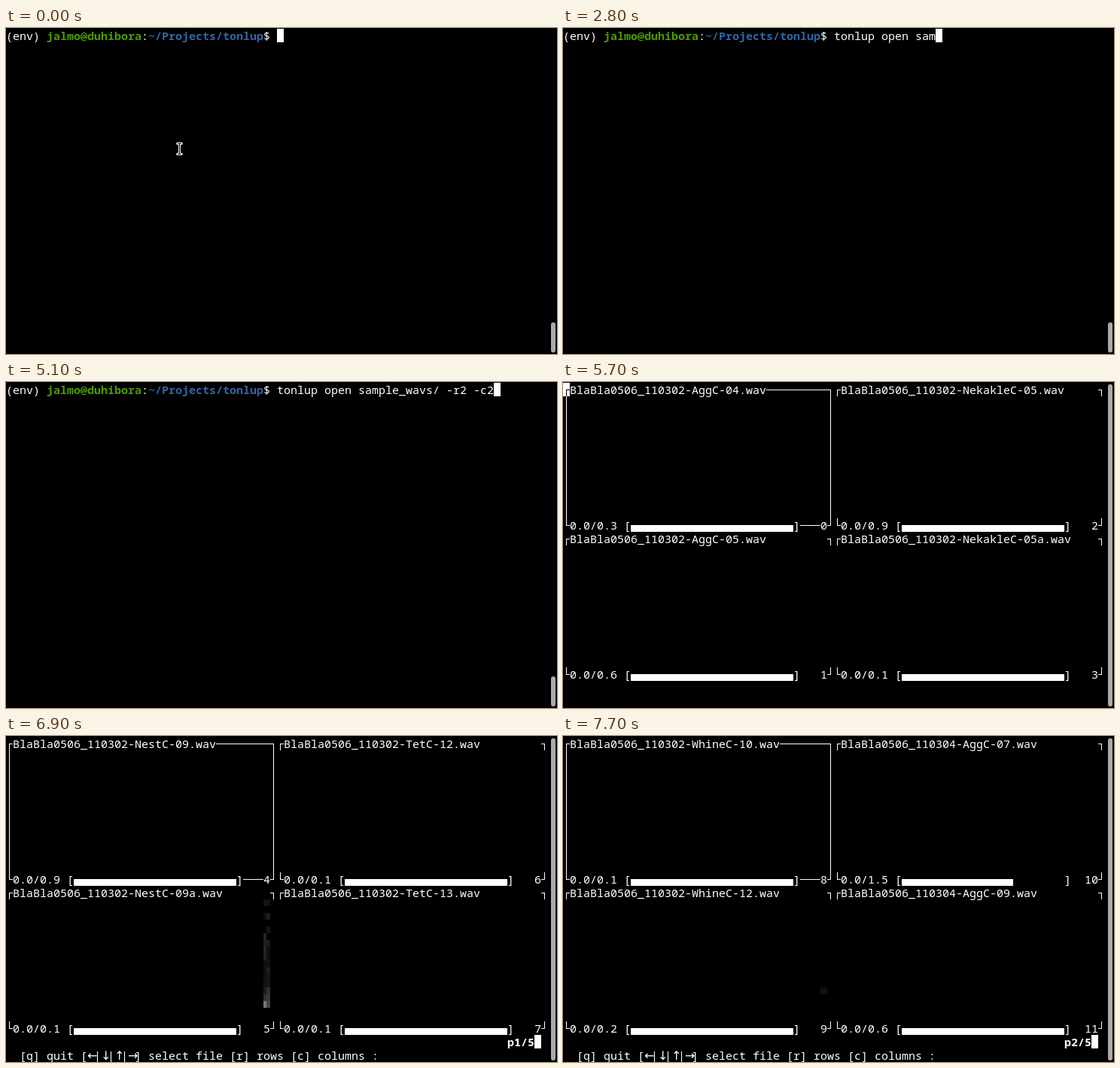
An HTML page for the animation above (8000 ms loop, 732x433 px).

```html
<!DOCTYPE html>
<html lang="en">
<head>
<meta charset="utf-8">
<title>Terminal spectrogram browser</title>
<style>
  html, body { margin: 0; width: 100%; height: 100%; overflow: hidden; background: #000; }
  svg { position: absolute; left: 0; top: 0; display: block; }
  text { font: 15px "Noto Sans Mono", "DejaVu Sans Mono", monospace; white-space: pre; }
  .bold { font-weight: 700; }
  .arrow { font: 16px "DejaVu Sans", sans-serif; }
</style>
</head>
<body>
<svg id="stage" width="732" height="433" viewBox="0 0 732 433"></svg>
<script>
const LOOP = 8000, CW = 9, RH = 18, COLS = 76, ROWS = 16;
const WHITE = '#fff', GREEN = '#4e9a06', BLUE = '#3465a4';
const stage = document.getElementById('stage');

// Bursts of typing: keys split by "|" land 100 ms apart.
const KEYS = Object.entries({
  900: 't|o', 1200: 'n|l|u|p', 1700: ' |o', 2000: 'p|e|n ', 2600: 's|a|m',
  3000: 'p', 3500: 'l|e_wavs/ ', 3800: '-', 4000: 'r', 4200: '2', 4400: ' ',
  4800: '-|c', 5100: '2'
}).flatMap(([at, keys]) => keys.split('|').map((key, i) => ({ at: +at + i * 100, key })));

// Later states inherit whatever they do not change.
const VIEWS = [
  { at: 5700, page: 0, pick: 0, filled: 0, label: 0, cursor: 'corner' },
  { at: 6000, filled: 2, cursor: 'off' },
  { at: 6100, filled: 4, label: 1 },
  { at: 6600, cursor: 'footer' },
  { at: 6900, page: 1, filled: 0 },
  { at: 7100, filled: 4, label: 2 },
  { at: 7400, pick: 2 },
  { at: 7700, page: 2, pick: 0, filled: 0 }
];
VIEWS.forEach((v, i) => { VIEWS[i] = { ...VIEWS[i - 1], ...v }; });

const hash = (a, b) => {
  const n = Math.sin(a * 127.1 + b * 311.7) * 43758.5453;
  return n - Math.floor(n);
};
const ramp = x => Math.min(1, Math.max(0, x));
const bump = (x, mid, spread) => Math.exp(-(((x - mid) / spread) ** 2));
const drift = (x, seed) => {
  const i = Math.floor(x);
  return hash(i, seed) + (hash(i + 1, seed) - hash(i, seed)) * (x - i);
};
const speckle = (c, r, seed) => .25 + 2.2 * hash(c + seed * 80, r + 1) ** 2;

// Harsh call: streaky haze above a bright low band
const rasp = (from, to) => (c, r, seed) => {
  const gate = ramp((c - from) / 10) * ramp((to - c) / 12);
  const haze = 28 * (.4 + 1.2 * hash(c, seed + 40)) * bump(r, 6, 8);
  const band = 190 * (.25 + drift(c / 3, seed + 7)) * bump(r, 14.2, 1.1 + c / 150);
  const floor = 55 * ramp((c - from + 12) / 6) * bump(r, 15, .5);
  return gate * haze * speckle(c, r, seed) +
    (gate * band + floor) * (.45 + .9 * hash(c + seed, r));
};

// Short clicks across all pitches
const pulses = (...centers) => (c, r, seed) => {
  const near = centers.reduce((sum, x) => sum + Math.exp(-(((c - x) / 2) ** 4)), 0);
  const body = (50 + 120 * bump(r, 9.5, 2.5)) * ramp((r + 1) / 3);
  return near * body * speckle(c, r, seed);
};

// Two-part whistle with evenly spaced, gently bending overtones
const whistle = (first, second) => (col, r, seed) => {
  const c = col - col % 2, mid = (first + second) / 2;
  const bend = .6 * Math.cos((c - first) / (second - first) * Math.PI);
  const notes = bump(c, first, 8) + bump(c, second, 9) + .28 * bump(c, mid, 20);
  let v = 0;
  for (let k = 0; k < 4; k++) {
    const row = 2.4 + 3.8 * k + bend;
    v += 215 * bump(k, 1.8, 1.7) * (bump(r, row, .65) + .1 * bump(r, row, 1.8));
  }
  return v * notes * (.7 + .6 * hash(c + seed, r));
};

const blip = (c, r) => r === 13 ? 17 : 0;

// "early" panels show their right edge as soon as the page opens.
const PAGES = [[
  { name: '110302-AggC-04', len: '0.3', sound: rasp(11, 74) },
  { name: '110302-AggC-05', len: '0.6', sound: rasp(27, 90) },
  { name: '110302-NekakleC-05', len: '0.9', sound: pulses(3.8, 34, 61.4, 72) },
  { name: '110302-NekakleC-05a', len: '0.1', sound: whistle(37, 57) }
], [
  { name: '110302-NestC-09', len: '0.9', sound: pulses(6, 28, 52) },
  { name: '110302-NestC-09a', len: '0.1', sound: rasp(22, 82), early: true },
  { name: '110302-TetC-12', len: '0.1', sound: whistle(30, 52) },
  { name: '110302-TetC-13', len: '0.1', sound: whistle(34, 54) }
], [
  { name: '110302-WhineC-10', len: '0.1' },
  { name: '110302-WhineC-12', len: '0.2', sound: blip, early: true },
  { name: '110304-AggC-07', len: '1.5', bar: 148 },
  { name: '110304-AggC-09', len: '0.6' }
]];

const latest = (list, t) => list.filter(s => s.at <= t).pop();
const box = (x, y, w, h, fill = WHITE) =>
  `<rect x="${x}" y="${y}" width="${w}" height="${h}" fill="${fill}"/>`;
const text = (x, row, str, fill = WHITE, cls = '') =>
  `<text x="${x}" y="${row * RH + 16}" fill="${fill}" class="${cls}">${str}</text>`;
const cursor = (col, row) => box(col * CW, row * RH + 1, CW, RH);
const scrollbar = top =>
  `<rect x="724" y="${top}" width="6" height="${431 - top}" rx="3" fill="#aaa"/>`;

function spectrum(sound, x, y, seed, from) {
  let out = '';
  for (let r = 0; r < ROWS; r++) for (let c = from; c < COLS; c++) {
    const v = Math.min(238, Math.round(sound(c, r, seed)));
    const left = Math.floor(c * CW / 2), right = Math.floor((c + 1) * CW / 2);
    if (v > 9) out += box(x + left, y + r * 9, right - left, 9, `rgb(${v},${v},${v})`);
  }
  return out;
}

function panel(p, slot, index, selected, filled) {
  const x = slot > 1 ? 360 : 0, row = slot % 2 * 11, y = row * RH;
  const title = `BlaBla0506_${p.name}.wav`, num = String(index);
  const right = x + 355, bottom = y + 190, numX = x + 351 - num.length * CW;
  let out = '';
  if (p.sound && (filled || p.early))
    out += spectrum(p.sound, x + 9, y + 19, index, filled ? 0 : COLS - 2);

  for (const edge of [y + 10, bottom])
    out += box(x + 4, edge, 5, 1) + box(right - 4, edge, 5, 1);
  for (const side of [x + 4, right]) {
    out += selected ? box(side, y + 10, 1, 181)
                    : box(side, y + 10, 1, 9) + box(side, y + 181, 1, 10);
  }
  if (selected) {
    const end = x + 9 + title.length * CW;
    out += box(end, y + 10, right - end, 1) + box(x + 315, bottom, numX - x - 315, 1);
  }
  return out + text(x + 9, row, title) + text(x + 9, row + 10, `0.0/${p.len} [`) +
    box(x + 90, bottom, p.bar || 216, 9) + text(x + 306, row + 10, ']') +
    text(numX, row + 10, num);
}

function footer(page) {
  const arrows = [...'←↓↑→'].map((a, i) => text(108 + i * 18, 23, a, WHITE, 'arrow'));
  return text(666, 22, `p${page}/5`, WHITE, 'bold') + arrows.join('') +
    text(18, 23, '[q] quit [ | | | ] select file [r] rows [c] columns :');
}

function shell(t) {
  const typed = KEYS.filter(k => k.at <= t).map(k => k.key).join('');
  let out = text(0, 0, '(env)') + text(54, 0, 'jalmo@duhibora', GREEN, 'bold') +
    text(180, 0, ':') + text(189, 0, '~/Projects/tonlup', BLUE, 'bold') +
    text(342, 0, '$') + text(360, 0, typed) + scrollbar(391);
  if (t >= 5500) out += cursor(0, 1);
  else if (t < 400 || typed) out += cursor(40 + typed.length, 0);
  if (!typed) {
    const beam = 'M228 153.5H233M230.5 153.5V167.5M228 167.5H233';
    out += `<path d="${beam}" stroke="#fff" stroke-width="3" stroke-linecap="square" fill="none"/>` +
           `<path d="${beam}" stroke="#000" fill="none"/>`;
  }
  return out;
}

function browser(v) {
  let out = scrollbar(3);
  PAGES[v.page].forEach((p, i) => {
    out += panel(p, i, v.page * 4 + i, i === v.pick, i < v.filled);
  });
  if (v.label) out += footer(v.label);
  if (v.cursor === 'footer') out += cursor(78, 22);
  if (v.cursor === 'corner')
    out += cursor(0, 0) + box(4, 10, 5, 1, '#000') + box(4, 10, 1, 9, '#000');
  return out;
}

// Rebuild the picture only when a step boundary is passed.
const STEPS = [{ at: 0 }, { at: 400 }, ...KEYS, { at: 5500 }, ...VIEWS];
const start = performance.now();
let shown;
function tick() {
  const step = latest(STEPS, (performance.now() - start) % LOOP);
  if (step !== shown) {
    shown = step;
    const view = latest(VIEWS, step.at);
    stage.innerHTML = box(0, 0, 732, 433, '#000') + (view ? browser(view) : shell(step.at));
  }
  requestAnimationFrame(tick);
}
tick();
</script>
</body>
</html>
```
